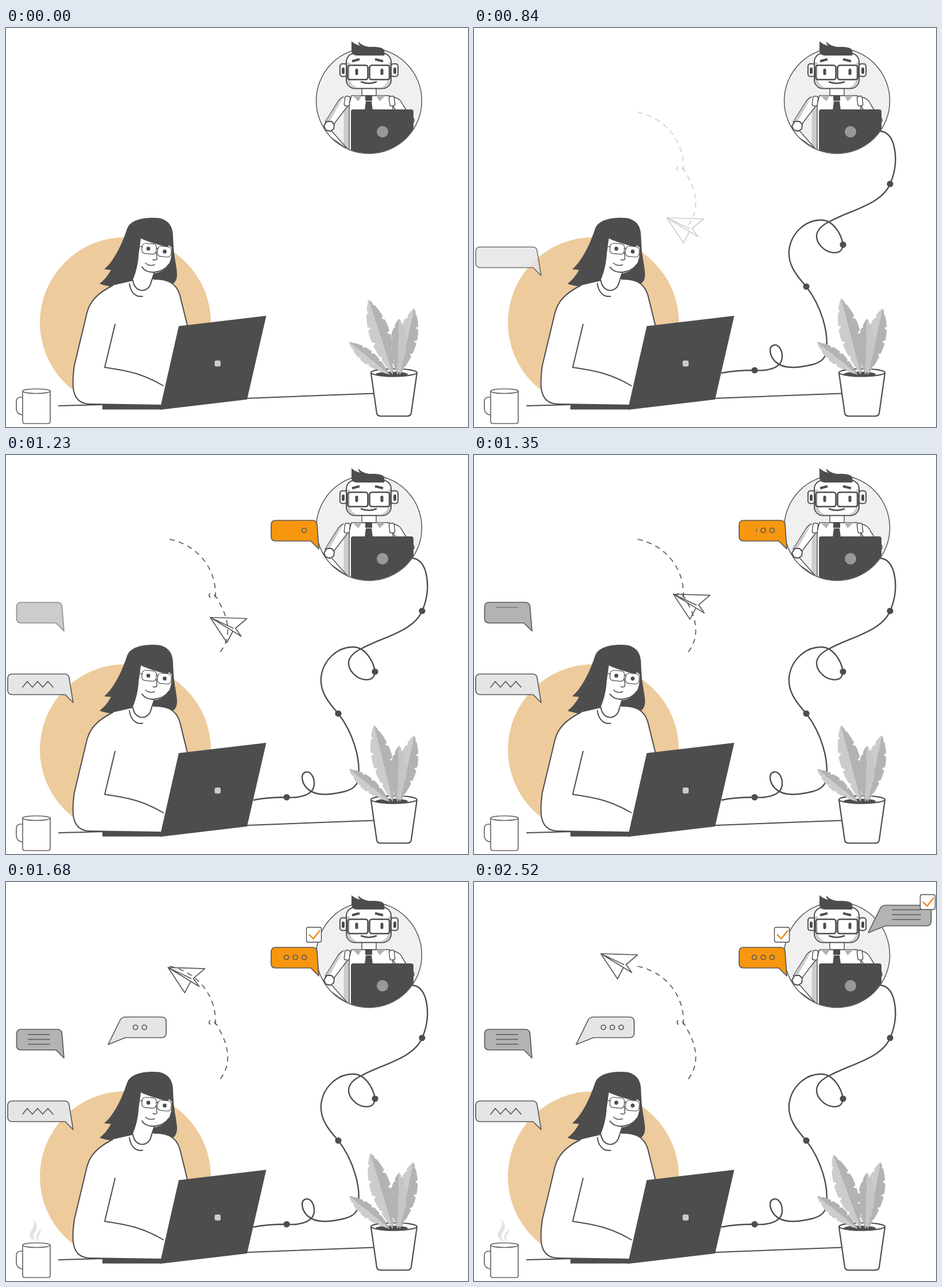
These frames come from a looping animation (805 by 696 pixels, 2.7 s). An HTML page:

```html
<!DOCTYPE html>
<html lang="en">
<head>
<meta charset="utf-8">
<title>Remote chat</title>
<style>
html, body { margin: 0; height: 100%; overflow: hidden; background: #fff; }
svg { display: block; width: 100vw; height: 100vh; }
.ink { fill: none; stroke: #4d4d4d; stroke-width: 2; stroke-linecap: round; stroke-linejoin: round; }
.thin { stroke-width: 1.4; }
.paper { fill: #fff; }
.dark { fill: #4d4d4d; }
.shade { fill: #ccc; }
</style>
</head>
<body>
<svg viewBox="0 0 805 696">
  <defs>
    <clipPath id="porthole"><circle cx="632.5" cy="127" r="91.5"/></clipPath>
  </defs>

  <!-- woman at the desk -->
  <circle cx="208" cy="514" r="149" fill="#eecb9d"/>
  <path class="ink" d="M92 659L168 657M420 646L641 637.5"/>
  <path class="dark" d="M171 421C190 405 204 372 211 350C217 335 236 331 258 331C281 331 291 344 291 364L292 383C293 400 298 418 298 430C298 440 294 445 288 447L222 450C205 455 180 452 163 446Q175 437 183 422Z"/>
  <path class="paper" d="M186 449C157 464 146 478 141 497L119 589C114 625 114 655 146 656L270 658L316 519L303 466C296 443 280 438 258 438L221 441Z"/>
  <path class="ink" d="M186 449C157 464 146 478 141 497L119 589C114 625 114 655 146 656L270 658M258 438C280 438 296 443 303 466L316 519M190 517L172 592C215 598 240 604 274 624"/>
  <path class="paper" d="M235 367C247 373 264 378 281 382L284 379L289 383C289 399 286 412 279 418C273 424 265 427 258 428L253 443C250 463 224 463 221 439C227 427 231 405 231 396Z"/>
  <path class="ink" d="M237 417C246 431 273 428 284 412M258 428L253 443C249 463 224 463 221 440M215 446C217 462 227 470 238 468"/>
  <path class="ink thin" d="M262 391L263 403Q261 406 256 404M243 410Q249 416 259 413M234 381L237 382M262 384L265 385"/>
  <g class="ink thin" style="stroke-width:1.2">
    <rect x="237" y="376" width="25" height="18" rx="6" transform="rotate(5 249 385)"/>
    <rect x="264" y="381" width="24" height="18" rx="6" transform="rotate(5 276 390)"/>
  </g>
  <g class="dark">
    <circle cx="248" cy="385" r="3.4"/><circle cx="276.500" cy="390" r="3.4"/>
    <path d="M168 657H272V665.500H168ZM301 520L453.500 502L420 648L268 666Z"/>
  </g>
  <rect x="363.500" y="580" width="10.500" height="10.500" rx="3" class="shade"/>

  <!-- mug -->
  <path id="steam" fill="#e3e3e3" d="M47 587C57 598 54 606 50 612C46 617 48 622 52 627C43 624 38 617 44 608C50 600 49 594 47 587ZM59 603C62 610 60 613 57 617C55 620 57 624 60 628C53 625 50 619 54 614C58 609 59 607 59 603Z"/>
  <g class="ink" style="stroke:#666;stroke-width:1.7">
    <path d="M29 644H24Q18 645 18 652V665Q19 674 29 675"/>
    <path class="paper" d="M29 633V686Q29 690 33 690H73Q77 690 77 686V633"/>
    <ellipse class="paper" cx="53" cy="633.500" rx="24" ry="4"/>
  </g>

  <!-- connecting cord -->
  <path id="cord" class="ink" style="stroke-width:2.4;stroke-linecap:butt" d="M431 602C450 598 470 597 489 597C515 599 537 592 537 573C537 560 530 552 523 553C512 555 515 572 525 582C540 596 565 593 590 587C605 583 613 576 614 562C618 530 605 485 579 451C560 430 547 412 549 388C552 360 575 335 605 335C625 335 640 358 643 378C642 390 635 392 627 392C610 391 596 375 597 362C598 350 610 342 621 337C655 318 710 308 725 272C735 250 737 225 731 203C727 190 720 181 708 180"/>
  <g id="knots" class="dark"></g>

  <!-- plant -->
  <g class="ink" style="stroke-width:2.2">
    <path class="paper" d="M636 602L646 672Q647 677 653 677H699Q705 677 706 672L716 602"/>
    <ellipse class="paper" cx="676" cy="601" rx="40" ry="6.500"/>
  </g>
  <ellipse class="dark" cx="672" cy="604" rx="28" ry="4.500"/>
  <g id="plant"></g>

  <!-- robot in the porthole -->
  <circle cx="632.500" cy="127" r="92" fill="#f0f0f0"/>
  <g clip-path="url(#porthole)">
    <path class="shade" d="M600 120L589 140L588 220H612V118Z"/>
    <path class="ink thin paper" d="M602 118H668L674 135V220H598V132Z"/>
    <path class="ink thin paper" d="M588 120Q582 123 578 129L556 164L568 172L597 134M566 178L596 212L562 188M677 121Q687 123 691 133L700 147L684 150L674 136M706 153Q712 157 711 163L707 168"/>
    <path class="shade" d="M587 122L578 131L557 163L562 166Z"/>
    <path class="ink paper" d="M559 163L567 163L572 168L571 176L565 180L557 178L554 171Z"/>
  </g>
  <circle class="ink thin" cx="632.500" cy="127" r="92"/>
  <g class="ink thin">
    <rect class="paper" x="590" y="119" width="9" height="17" rx="3" transform="rotate(7 594 127)"/>
    <rect class="paper" x="668" y="119" width="9" height="17" rx="3" transform="rotate(-7 672 127)"/>
    <path class="paper" d="M620 104H645V118H620Z"/>
  </g>
  <path fill="#b3b3b3" d="M604 118L620 118L614 128ZM661 118L645 118L651 128Z"/>
  <path class="dark" d="M626 117H638V127H626ZM627 128H637L639 143H625Z"/>
  <g clip-path="url(#porthole)">
    <rect class="dark" x="601" y="142" width="109" height="90" rx="4"/>
    <circle cx="656" cy="181" r="10" fill="#999"/>
  </g>
  <g class="ink">
    <rect class="paper" x="582" y="62.500" width="12" height="22" rx="4"/>
    <rect class="paper" x="671" y="62.500" width="12" height="22" rx="4"/>
    <rect class="paper" x="593" y="44" width="78" height="61.500" rx="15"/>
  </g>
  <path class="shade" d="M594 60V91Q595 104 608 104.500H615Q600 101 599 88V60ZM670 60V91Q669 104 656 104.500H650Q665 101 666 88V60Z"/>
  <path class="dark" d="M602 23Q608 29 618 31Q613 28 614 24Q620 31 633 33Q648 32 657 36Q661 42 659 48H611Q602 47 602 40Z"/>
  <g class="dark">
    <rect x="585" y="69" width="5" height="11" rx="2"/><rect x="675" y="69" width="5" height="11" rx="2"/>
    <rect x="608.500" y="71" width="5" height="11" rx="2"/><rect x="652.500" y="71" width="5" height="11" rx="2"/>
  </g>
  <path class="ink" style="stroke-width:4;stroke-linecap:butt" d="M603 58L616 54.500M643 54.500L657 58"/>
  <g class="ink" style="stroke-width:2.600">
    <rect x="595.500" y="65" width="35" height="25" rx="4"/><rect x="633.500" y="65" width="35" height="25" rx="4"/>
    <path d="M619 94Q632 99 645 94"/>
  </g>

  <!-- paper plane -->
  <g id="flight" class="ink thin" style="stroke:#5a5a5a">
    <path style="stroke-dasharray:9 7.500;stroke-width:1.700;stroke-linecap:butt" d="M285 147C335 157 367 200 365 247C358 252 351 247 355 242C358 238 367 246 372 258C390 290 392 320 373 344"/>
    <path id="plane" style="stroke-width:1.700" d="M0 0L64 2L44 19L54 33L0 0L29 44L39 25M0 0L40 19"/>
  </g>
  <g id="chat"></g>
</svg>
<script>
const LOOP = 2700, STEP = 30;
const $ = id => document.getElementById(id);
const add = (parent, markup) => {
  parent.insertAdjacentHTML('beforeend', markup);
  return parent.lastElementChild;
};
const ramp = (t, from, to) => Math.min(1, Math.max(0, (t - from) / (to - from)));
const track = (t, keys) => {
  const i = Math.max(1, keys.findIndex(k => k[0] >= t));
  if (t >= keys[keys.length - 1][0]) return keys[keys.length - 1][1];
  const [a, u] = keys[i - 1], [b, v] = keys[i];
  return u + (v - u) * ramp(t, a, b);
};
const updates = [];
const fade = (el, from, to) => updates.push(t => { el.style.opacity = ramp(t, from, to); });

// Uncover an element in one direction: right, left, down or up.
let clips = 0;
function wipe(el, [x, y, w, h], way, from, to) {
  const id = 'wipe' + clips++;
  const rect = add(document.querySelector('defs'), `<clipPath id="${id}"><rect/></clipPath>`).firstChild;
  el.setAttribute('clip-path', `url(#${id})`);
  updates.push(t => {
    const p = ramp(t, from, to), across = way === 'right' || way === 'left';
    const box = {
      x: way === 'left' ? x + w * (1 - p) : x,
      y: way === 'up' ? y + h * (1 - p) : y,
      width: across ? w * p : w,
      height: across ? h : h * p
    };
    for (const k in box) rect.setAttribute(k, box[k]);
  });
}

// Speech bubbles with their contents
const dots = (x, y) => [0, 15.5, 31].map(d => `<circle cx="${x + d}" cy="${y}" r="4"/>`).join('');
const lines = (x, y, w) => `<path d="${[0, 8.5, 17].map(d => `M${x} ${y + d}h${w}`).join('')}"/>`;
const tailRight = (x, y, w, dx) =>
  `M${x + 8} ${y}h${w - 16}q7 0 8 7l${dx} 43l-14 -14H${x + 8}q-8 0 -8 -8v-20q0 -8 8 -8Z`;
const tailLeft = (x, y, w) =>
  `M${x + 8} ${y}h${w - 16}q8 0 8 8v20q0 8 -8 8H${x + 8}l-30 12l20 -41q3 -7 10 -7Z`;

function bubble(shape, fill, shown, content, box, way, from, to) {
  const g = add($('chat'), `<g class="ink thin" style="stroke-width:1.7;stroke:#5a5a5a">
    <path d="${shape}" style="fill:${fill}"/><g>${content}</g></g>`);
  fade(g, ...shown);
  wipe(g.lastElementChild, box, way, from, to);
}
function tick(x, y, from, to) {
  fade(add($('chat'), `<g class="ink thin"><rect class="paper" x="${x}" y="${y}" width="26" height="26" rx="3"/>
    <path d="M${x + 5} ${y + 13}l7 7l11 -14" style="stroke:#ee7f0e;stroke-width:2.2"/></g>`), from, to);
}
const LIGHT = '#e5e5e5', GREY = '#b3b3b3';
bubble(tailRight(3, 382, 107, 7), LIGHT, [690, 870],
  '<path d="M29 405l8 -10l9 10l9 -10l9 10l9 -10l9 10" />', [27, 390, 58, 20], 'right', 900, 1200);
bubble(tailRight(462, 114, 80, 3), '#f7960f', [870, 1050],
  dots(488.5, 131.5), [483, 125, 42, 14], 'left', 1113, 1413);
bubble(tailRight(18.500, 257, 79, 3.5), GREY, [1110, 1290],
  lines(39, 266, 37), [37, 264, 42, 22], 'down', 1335, 1490);
bubble(tailLeft(200, 235.5, 79), LIGHT, [1350, 1470],
  dots(225.5, 253.5), [220, 247, 43, 14], 'right', 1490, 1780);
tick(523.5, 79, 1440, 1630);
bubble(tailLeft(709, 40.5, 87.5), GREY, [1700, 1880],
  lines(729, 48.5, 49), [727, 46.5, 53, 21], 'down', 1930, 2150);
tick(777.5, 22, 2220, 2430);

// Feathered leaves: one half on each side of the rib
function leaf(base, tip, width, left, right, sway) {
  const len = Math.hypot(tip[0] - base[0], tip[1] - base[1]);
  const turn = Math.atan2(tip[0] - base[0], base[1] - tip[1]) * 180 / Math.PI;
  const half = side => {
    let d = 'M0 0';
    for (let i = 1; i <= 40; i++) {
      const s = i / 40, notch = i % 8 === (side < 0 ? 2 : 5) ? 0.7 : 1;
      d += `L${(side * width * Math.sin(Math.PI * s ** 1.15) ** 0.8 * notch || 0).toFixed(1)} ${(-len * s).toFixed(1)}`;
    }
    return d + 'Z';
  };
  const el = add($('plant'), `<g><path d="${half(-1)}" fill="${left}"/><path d="${half(1)}" fill="${right}"/></g>`);
  updates.push(t => el.setAttribute('transform',
    `translate(${base}) rotate(${turn + (sway ? track(t, sway) : 0)})`));
}
leaf([674, 605], [632, 474], 18, '#ccc', GREY, [[0, 0], [480, 0.9], [1080, 4.8], [1950, -0.4], [2520, -2.6]]);
leaf([686, 605], [711, 489], 17, '#ccc', GREY, [[0, 0], [480, 0.4], [1080, 0.4], [1950, -1.4], [2520, -1.4]]);
leaf([669, 605], [598, 548], 12, '#ccc', GREY);
leaf([682, 605], [685, 507], 14.5, GREY, '#c6c6c6');

// Cord drawn from the laptop; each knot shows once the tip passes it
const cord = $('cord'), cordLength = cord.getTotalLength();
cord.style.strokeDasharray = cordLength + ' ' + cordLength;
const drawn = t => 1 - (1 - ramp(t, 0, 850)) ** 2;
updates.push(t => {
  cord.style.strokeDashoffset = cordLength * (1 - drawn(t));
  cord.style.visibility = t ? 'visible' : 'hidden';
});
for (const [x, y] of [[489, 597], [579, 451], [643, 378], [725, 272]]) {
  const knot = add($('knots'), `<circle cx="${x}" cy="${y}" r="5.6"/>`);
  let at = 0, best = Infinity;
  for (let s = 0; s < cordLength; s += 2) {
    const p = cord.getPointAtLength(s), gap = Math.hypot(p.x - x, p.y - y);
    if (gap < best) { best = gap; at = s / cordLength; }
  }
  updates.push(t => knot.setAttribute('r', 5.6 * ramp(drawn(t), at, at + 0.03)));
}

const route = document.createElementNS('http://www.w3.org/2000/svg', 'path');
route.setAttribute('d', 'M336 331C352 312 365 280 348 244C340 230 335 210 325 195C303 157 265 132 221 125');
const routeLength = route.getTotalLength();
updates.push(t => {
  const p = route.getPointAtLength(routeLength * ramp(t, 1080, 1870));
  $('plane').setAttribute('transform', `translate(${p.x} ${p.y})`);
});
fade($('flight'), 780, 990);
wipe($('steam'), [35, 586, 30, 40], 'up', 1410, 1710);

function draw() {
  const t = Math.min(2520, Math.floor(performance.now() % LOOP / STEP) * STEP);
  updates.forEach(update => update(t));
  requestAnimationFrame(draw);
}
draw();
</script>
</body>
</html>
```
